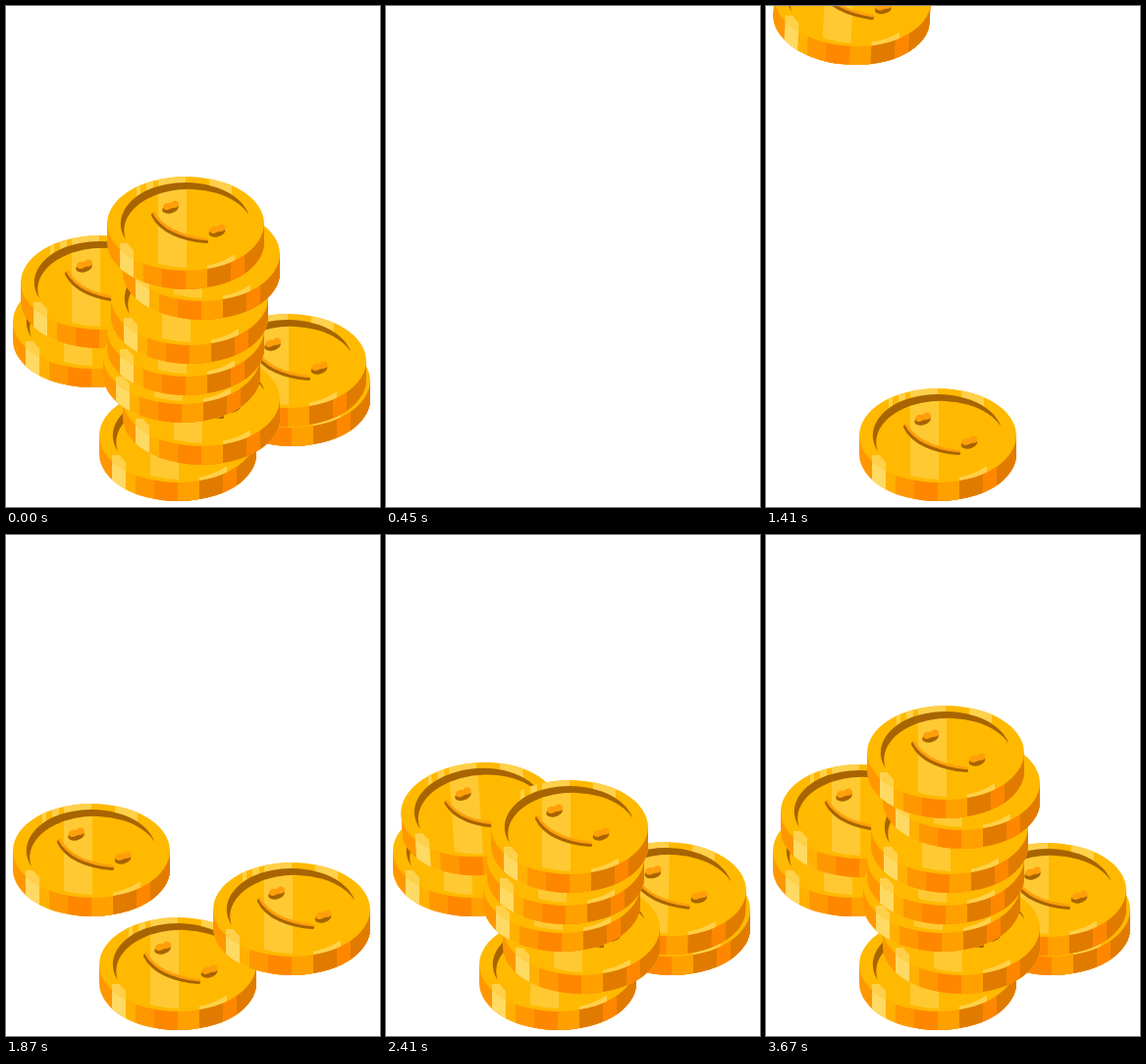
Write an HTML page that moves like this. It is 381 px wide and 511 px high and loops after 4.51 s.

```html
<!DOCTYPE html>
<html lang="en">
<head>
<meta charset="utf-8">
<title>Coin stack</title>
<style>
html, body { margin: 0; width: 100%; height: 100%; overflow: hidden; background: #fff; }
svg { display: block; width: 100vw; height: 100vh; }
</style>
</head>
<body>
<svg viewBox="0 0 381 511" preserveAspectRatio="none">
  <defs>
    <clipPath id="sideClip"><path d="M-80 0V19A80 48 0 0 0 80 19V0Z"/></clipPath>
    <clipPath id="topClip"><ellipse rx="80" ry="48"/></clipPath>
    <clipPath id="dishClip"><ellipse cx="1" cy="3" rx="66" ry="42"/></clipPath>
    <g id="eye">
      <ellipse cx="-15.500" cy="-15.500" rx="8.500" ry="4.800" transform="rotate(-15 -15.500 -15.500)" fill="#a86400"/>
      <path d="M-23 -17C-23 -21 -18 -22 -15 -21C-13 -25 -7 -24 -7 -20C-7 -15 -13 -17 -16 -15C-19 -13 -23 -14 -23 -17Z" fill="#ff9f0a"/>
    </g>
    <g id="coin">
      <g id="side" clip-path="url(#sideClip)"></g>
      <ellipse rx="80" ry="48" fill="#ffb900"/>
      <g clip-path="url(#topClip)" fill="#ffd04a">
        <path d="M-50 -48h4v28h-4zM-40 -48h7v28h-7zM-28 -48h28v20h-28zM24 -48h23v24h-23zM-67 20h14v28h-14zM22 32h28v16h-28z"/>
      </g>
      <g clip-path="url(#dishClip)">
        <rect x="-70" y="-45" width="145" height="100" fill="#ffb900"/>
        <rect x="-28" y="-45" width="29" height="100" fill="#ffc933"/>
      </g>
      <path d="M-61.200 16A66 42 0 1 1 64.200 -9.200A66 42 0 0 0 -61.200 16Z" fill="#a86400"/>
      <g fill="none" stroke-linecap="round">
        <path d="M-33 -9C-25 8 -3 16 21 18" stroke="#a86400" stroke-width="4.200"/>
        <path d="M-32.500 -11C-23 6 -2 13.500 21.500 16" stroke="#ff9f0a" stroke-width="2.600"/>
      </g>
      <use href="#eye"/>
      <use href="#eye" x="47.500" y="24"/>
    </g>
  </defs>
  <rect width="381" height="511" fill="#fff"/>
  <g id="pile"></g>
</svg>
<script>
const LOOP = 4510, STEP = 30;
const FADE = 90, EMPTY = 450;
const FALL = 60, SETTLE = 240, SWING = 200, DECAY = 100, MAX_KICK = 7;
const NS = 'http://www.w3.org/2000/svg';
const pile = document.getElementById('pile');
const side = document.getElementById('side');

function add(parent, tag, attrs) {
  const el = document.createElementNS(NS, tag);
  for (const k in attrs) el.setAttribute(k, attrs[k]);
  return parent.appendChild(el);
}

// Facets around the edge, each painted from its left border onwards
const facets = [
  [-80, '#ff9800'], [-67, '#ffda62'], [-53, '#ffb000'], [-43, '#ff9800'],
  [-24, '#ff8700'], [0, '#ffa000'], [22, '#e07b00'], [46, '#ff8700'], [60, '#e07b00']
];
for (const [x, fill] of facets) add(side, 'rect', { x, y: 0, width: 80 - x, height: 70, fill });

// Resting centre, start of the fall and tilt while falling, back to front
const coin = (x, y, at, lean) => ({ x, y, at, lean, el: add(pile, 'use', { href: '#coin' }) });
const base = [
  coin(175, 438, 780, 3),
  coin(87, 322, 1410, 3),
  coin(291, 382, 1660, 3),
  coin(95, 282, 2250, 10),
  coin(287, 362, 2280, -9)
];
const column = [
  coin(199, 401, 1960, 12),
  coin(179, 358, 2050, -34),
  coin(183, 330, 2110, 34),
  coin(187, 298, 2200, -16),
  coin(199, 253, 2830, 8),
  coin(183, 222, 3300, -30)
];
const coins = [...base, ...column];
column.forEach((c, i) => c.above = column[i + 1]);

const ageOf = (c, t) => Math.floor((t - c.at) / STEP) * STEP;

// Damped swing after landing, 1 at the moment of impact
function swing(age) {
  const a = age - FALL;
  return a < SETTLE ? Math.exp(-a / DECAY) * Math.cos(2 * Math.PI * a / SWING) : 0;
}

// A landing coin tips the one below it the other way
function kick(c, t) {
  const age = c ? ageOf(c, t) : 0;
  if (age < FALL) return 0;
  return -Math.max(-MAX_KICK, Math.min(MAX_KICK, c.lean * swing(age)));
}

function pose(c, t) {
  const age = ageOf(c, t);
  const left = Math.max(0, 1 - age / FALL);
  const landed = age >= FALL;
  return {
    x: c.x + 0.3 * c.lean * left,
    y: c.y - (c.y + 7) * left ** 3 + (landed ? 5 * swing(age) : 0),
    angle: c.lean * (landed ? swing(age) : 1) + kick(c.above, t)
  };
}

function draw(t) {
  const full = t < EMPTY;
  const steps = t < FADE ? 0 : Math.floor((t - FADE) / STEP) + 1;
  pile.setAttribute('opacity', full ? 1 - steps / 13 : 1);
  for (const c of coins) {
    c.el.style.display = full || t >= c.at ? '' : 'none';
    const p = pose(c, full ? LOOP : t);
    c.el.setAttribute('transform', `translate(${p.x} ${p.y}) rotate(${p.angle})`);
  }
}

const start = performance.now();
function tick() {
  draw((performance.now() - start) % LOOP);
  requestAnimationFrame(tick);
}
tick();
</script>
</body>
</html>
```
